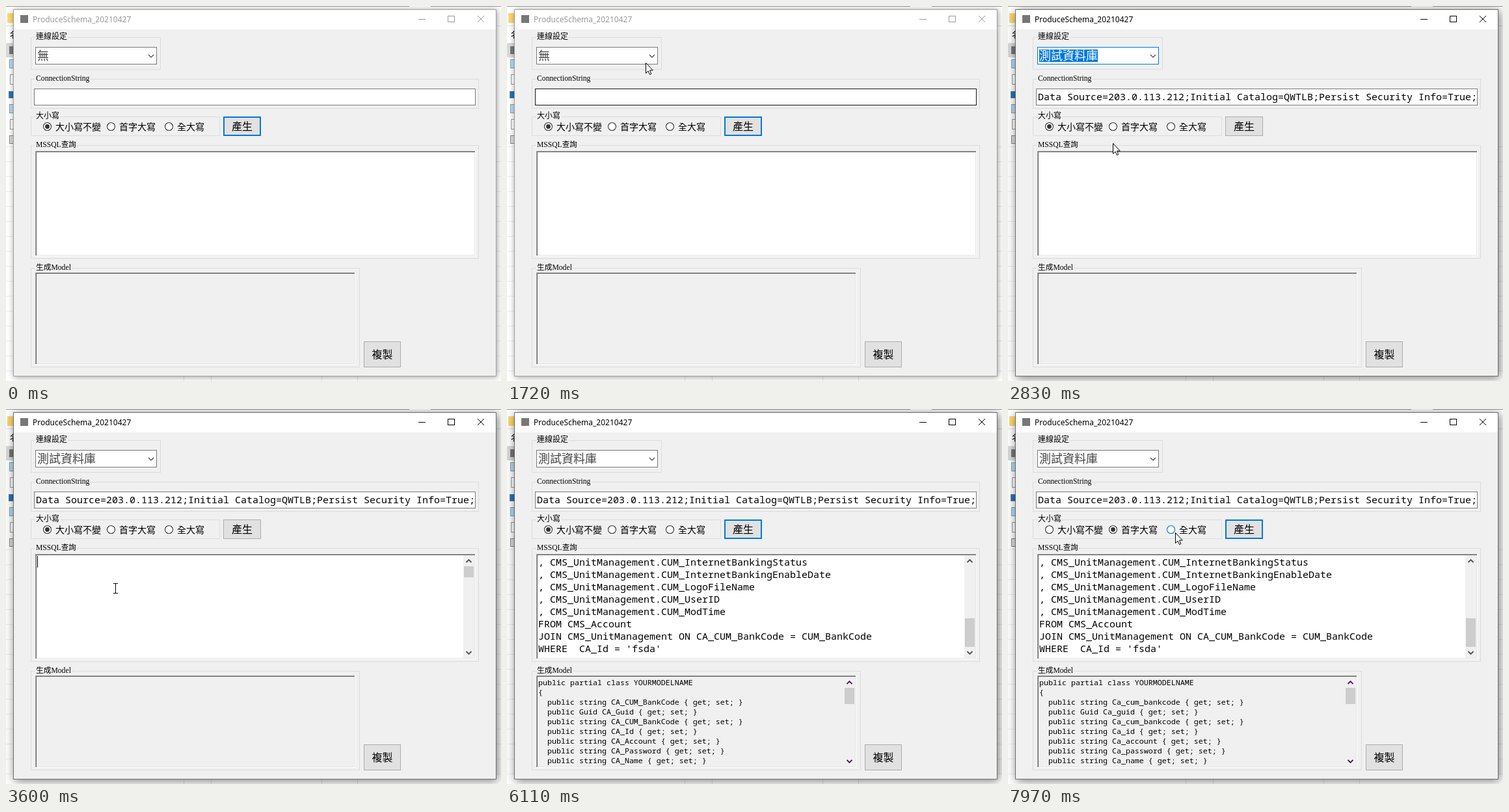
Animation, 761 px wide and 577 px high, one loop 8000 ms. Source, as an HTML page with a canvas:

```html
<!DOCTYPE html>
<html lang="zh-Hant">
<head>
<meta charset="utf-8">
<style>
html, body { margin: 0; width: 100%; height: 100%; overflow: hidden; background: #fff; }
canvas { display: block; }
</style>
</head>
<body>
<canvas id="stage" width="761" height="577"></canvas>
<script>
const ctx = document.getElementById('stage').getContext('2d');
const LOOP = 8000;
const BLUE = '#0078d7', FACE = '#f0f0f0', GRAY = '#7a7a7a';
const CJK = '"Noto Sans CJK TC", "Noto Sans CJK", sans-serif';
const CAPTION = '"Liberation Serif", ' + CJK;
const MONO = '"Noto Sans Mono", monospace';

// When the interface changes state (ms)
const OPEN = 2000, PICK = 2600, FOCUS_QUERY = 3250, SCROLLBAR = 3530, PASTE = 3670;
const RUN = 5500, RADIO = 7130, RERUN = 7540;

// Pointer stops: time, x, y
const PATH = [
  [0, 724, 590], [200, 724, 590], [260, 722, 566], [800, 212, 87], [1020, 172, 249],
  [1090, 172, 251], [1300, 172, 251], [1650, 213, 87], [1750, 213, 87], [1960, 220, 78],
  [2080, 220, 78], [2270, 190, 107], [2300, 190, 107], [2480, 150, 118], [2640, 150, 118],
  [2970, 168, 268], [3390, 168, 276], [3610, 168, 276], [3740, 190, 279], [4070, 190, 279],
  [4280, 214, 300], [4500, 214, 300], [4890, 391, 178], [4970, 391, 178], [5290, 380, 183],
  [5760, 380, 183], [6110, 588, 590], [6260, 600, 590], [7010, 161, 188], [7140, 161, 188],
  [7480, 372, 184], [7620, 372, 184], [7900, 261, 190], [7970, 257, 190], [8000, 257, 190]
];

const CONNECTION = 'Data Source=203.0.113.212;Initial Catalog=QWTLB;Persist Security Info=True;';
const QUERY = [
  ...['InternetBankingStatus', 'InternetBankingEnableDate', 'LogoFileName', 'UserID', 'ModTime']
    .map(column => ', CMS_UnitManagement.CUM_' + column),
  'FROM CMS_Account',
  'JOIN CMS_UnitManagement ON CA_CUM_BankCode = CUM_BankCode',
  "WHERE  CA_Id = 'fsda'"
];
const FIELDS = ['CUM_BankCode', 'Guid', 'CUM_BankCode', 'Id', 'Account', 'Password', 'Name'];

function fill(x, y, w, h, color) {
  ctx.fillStyle = color;
  ctx.fillRect(x, y, w, h);
}

function box(x, y, w, h, color, border, width = 1) {
  fill(x, y, w, h, border);
  fill(x + width, y + width, w - 2 * width, h - 2 * width, color);
}

function text(string, x, y, size, family, color = '#000', weight = 400) {
  ctx.font = `${weight} ${size}px ${family}`;
  ctx.fillStyle = color;
  ctx.fillText(string, x, y);
}

function line(points, color, width = 1) {
  ctx.beginPath();
  points.forEach(([x, y]) => ctx.lineTo(x, y));
  ctx.strokeStyle = color;
  ctx.lineWidth = width;
  ctx.stroke();
}

function chevron(x, y, dir, color, width = 1.2) {
  line([[x - 4, y - 2 * dir], [x, y + 2 * dir], [x + 4, y - 2 * dir]], color, width);
}

function shadowed(blur, dy, alpha, draw) {
  ctx.save();
  ctx.shadowColor = `rgba(0,0,0,${alpha})`;
  ctx.shadowBlur = blur;
  ctx.shadowOffsetX = ctx.shadowOffsetY = dy;
  draw();
  ctx.restore();
}

function group(x, y, w, h, caption, captionWidth, size) {
  box(x, y, w, h, FACE, '#dcdcdc');
  fill(x + 7, y, captionWidth, 1, FACE);
  text(caption, x + 8, y + 3, size, CAPTION);
}

function sunken(x, y, w, h, color) {
  box(x, y, w, h, '#e3e3e3', '#fff');
  fill(x, y, w - 1, 1, '#a0a0a0');
  fill(x, y, 1, h - 1, '#a0a0a0');
  fill(x + 1, y + 1, w - 2, 1, '#696969');
  fill(x + 1, y + 1, 1, h - 2, '#696969');
  fill(x + 2, y + 2, w - 4, h - 4, color);
}

function scrollbar(x, y, h, thumbY, thumbH, color) {
  fill(x, y, 17, h, FACE);
  fill(x + 1, thumbY, 15, thumbH, '#cdcdcd');
  chevron(x + 8.5, y + 9, -1, color, 1.8);
  chevron(x + 8.5, y + h - 8, 1, color, 1.8);
}

function button(x, y, w, h, label, { hover, pressed, focused }) {
  const color = pressed ? '#cce4f7' : hover ? '#e5f1fb' : '#e1e1e1';
  const border = pressed ? '#005499' : hover || focused ? BLUE : '#adadad';
  box(x, y, w, h, color, border, focused && !pressed ? 2 : 1);
  text(label, x + w / 2 - 16, y + h / 2 + 6, 16, CJK);
}

function radio(x, label, checked, hover) {
  const color = hover ? BLUE : '#333';
  ctx.beginPath();
  ctx.arc(x, 185.5, 6, 0, 7);
  ctx.fillStyle = '#fff';
  ctx.fill();
  ctx.strokeStyle = color;
  ctx.lineWidth = 1.1;
  ctx.stroke();
  if (checked) {
    ctx.beginPath();
    ctx.arc(x, 185.5, 3.4, 0, 7);
    ctx.fillStyle = color;
    ctx.fill();
  }
  text(label, x + 12.5, 191, 14, CJK);
}

function drawDesktop() {
  fill(0, 0, 761, 577, '#fff');
  fill(0, 0, 620, 1, '#999');
  fill(653, 0, 108, 1, '#999');
  fill(0, 30, 761, 1, '#e0e0e0');
  for (let y = 216; y < 577; y += 23) fill(0, y, 761, 1, '#ececec');
  for (const x of [273, 315, 485, 540]) fill(x, 560, 1, 17, '#e4e4e4');
  fill(2, 11, 10, 15, '#ffd76e');
  text('名', 6, 49, 12, CJK);
  fill(0, 57, 12, 22, '#d9d9d9');
  fill(5, 62, 8, 12, '#777');
  for (const y of [89, 158]) box(5, y - 7, 8, 14, '#b9dcf0', '#7f9fb3');
  for (const y of [113, 182]) box(6, y - 8, 8, 16, '#fff', '#999');
  box(4, 131, 9, 11, '#1e74c8', '#777');
  box(5, 199, 8, 13, '#ddd', '#888');
}

function drawWindow(active) {
  shadowed(active ? 14 : 9, active ? 2 : 1, active ? 0.55 : 0.4,
    () => fill(11, 5, 743, 565, '#888'));
  box(11, 5, 743, 565, FACE, active ? '#707070' : '#a0a0a0');
  fill(12, 6, 741, 30, '#fff');
  fill(22, 14, 12, 12, '#777');
  const ink = active ? '#000' : '#999';
  text('ProduceSchema_20210427', 41, 25, 12, '"Noto Sans", sans-serif', ink);
  fill(634, 20, 11, 1, ink);
  box(679, 15, 11, 10, '#fff', ink);
  line([[725, 15], [735, 25]], ink);
  line([[735, 15], [725, 25]], ink);
}

function drawCombo(t) {
  const open = t >= OPEN && t < PICK, selected = t >= OPEN && t < FOCUS_QUERY;
  const value = t < PICK ? '無' : '測試資料庫';
  box(45, 63, 187, 27, '#fff', selected ? BLUE : GRAY);
  if (selected) fill(48, 67, value.length * 18, 19, BLUE);
  text(value, 48, 82.5, 18, CJK, selected ? '#fff' : '#444', 300);
  if (open) box(215, 63, 17, 27, '#cce4f7', '#005499');
  chevron(223, 77, 1, '#444');
}

function drawList(pointer) {
  const hovered = pointer.y > 110 ? 1 : 0;
  shadowed(3, 2, 0.5, () => fill(45, 90, 187, 78, '#fff'));
  box(45, 90, 187, 78, '#fff', '#555');
  fill(46, 91 + hovered * 19, 185, 19, BLUE);
  ['無', '測試資料庫', '2', '3'].forEach((item, i) => {
    const color = i === hovered ? '#fff' : i < 2 ? '#444' : '#000';
    if (i < 2) text(item, 48, 107 + i * 19, 18, CJK, color, 300);
    else text(item, 48, 106 + i * 19, 15, MONO, color);
  });
}

function drawQuery(t) {
  sunken(45, 223, 677, 162, '#fff');
  const pasted = t >= PASTE;
  if (t >= SCROLLBAR) {
    scrollbar(703, 225, 158, pasted ? 322 : 242, pasted ? 44 : 17, '#505050');
  }
  if (pasted) QUERY.forEach((row, i) => text(row, 48, 241 + i * 19, 15, MONO));
  const blinkOn = Math.floor((t - PASTE) / 530) % 2 === 0;
  if (t >= FOCUS_QUERY && !pasted) fill(48, 226, 1, 18, '#000');
  else if (pasted && t < RUN && blinkOn) fill(237, 360, 1, 18, '#000');
}

function drawModel(t) {
  sunken(45, 410, 492, 142, FACE);
  if (t < RUN) return;
  const rename = name => t < RERUN ? name : name[0] + name.slice(1).toLowerCase();
  const rows = ['public partial class YOURMODELNAME', '{', ...FIELDS.map(field =>
    `  public ${field === 'Guid' ? 'Guid' : 'string'} ${rename('CA_' + field)} { get; set; }`)];
  rows.forEach((row, i) => text(row, 48, 425 + i * 15, 11.67, MONO));
  scrollbar(518, 412, 138, 429, 25, '#4b1a55');
}

function pointerAt(t) {
  const i = PATH.findIndex(stop => stop[0] > t);
  const [t0, x0, y0] = PATH[i - 1], [t1, x1, y1] = PATH[i];
  const p = (t - t0) / (t1 - t0), k = p * p * (3 - 2 * p);
  return { x: x0 + (x1 - x0) * k, y: y0 + (y1 - y0) * k };
}

function drawPointer({ x, y }, beam) {
  ctx.save();
  ctx.translate(Math.round(x), Math.round(y));
  if (beam) {
    fill(0, -8, 1, 16, '#000');
    for (const edge of [-8, 7]) {
      fill(-3, edge, 3, 1, '#000');
      fill(1, edge, 3, 1, '#000');
    }
  } else {
    const arrow = [[0.5, 0.5], [0.5, 16.5], [4, 13], [6.5, 18.5], [8.8, 17.5], [6.5, 12], [11.3, 12]];
    ctx.beginPath();
    arrow.forEach(([px, py]) => ctx.lineTo(px, py));
    ctx.closePath();
    ctx.fillStyle = '#fff';
    ctx.fill();
    ctx.strokeStyle = '#000';
    ctx.lineWidth = 1;
    ctx.stroke();
  }
  ctx.restore();
}

function draw(t) {
  const pointer = pointerAt(t);
  const over = (x, y, w, h) =>
    pointer.x >= x && pointer.x < x + w && pointer.y >= y && pointer.y < y + h;
  const within = (from, to) => t >= from && t < to;

  drawDesktop();
  drawWindow(t >= OPEN);

  group(38, 48, 200, 50, '連線設定', 50, 12);
  drawCombo(t);

  group(38, 112, 689, 46, 'ConnectionString', 84, 11.7);
  // The hover border lingers a little after the pointer leaves
  const hot = within(740, 1230) || within(1500, 1900);
  box(43, 127, 679, 26, '#fff', hot ? '#171717' : GRAY);
  if (t >= PICK) text(CONNECTION, 46, 145, 15, MONO);

  group(38, 170, 291, 30, '大小寫', 38, 12);
  radio(63.5, '大小寫不變', t < RADIO, false);
  radio(161.5, '首字大寫', t >= RADIO, over(155, 177, 76, 18));
  radio(250.5, '全大寫', false, over(244, 177, 62, 18));
  button(334, 170, 58, 30, '產生', {
    hover: over(334, 170, 58, 30),
    pressed: within(5440, 5530) || within(7500, 7570),
    focused: t < OPEN || within(RUN, RADIO) || t >= RERUN
  });

  group(38, 214, 689, 175, 'MSSQL查詢', 63, 11.6);
  drawQuery(t);

  group(38, 403, 506, 153, '生成Model', 56, 11.7);
  drawModel(t);
  button(550, 516, 57, 40, '複製', { hover: over(550, 516, 57, 40) });

  if (within(OPEN, PICK)) drawList(pointer);
  drawPointer(pointer, over(44, 128, 677, 24) || over(47, 225, 656, 158) || over(47, 412, 471, 138));
}

function tick() {
  draw(performance.now() % LOOP);
  requestAnimationFrame(tick);
}
tick();
</script>
</body>
</html>
```
